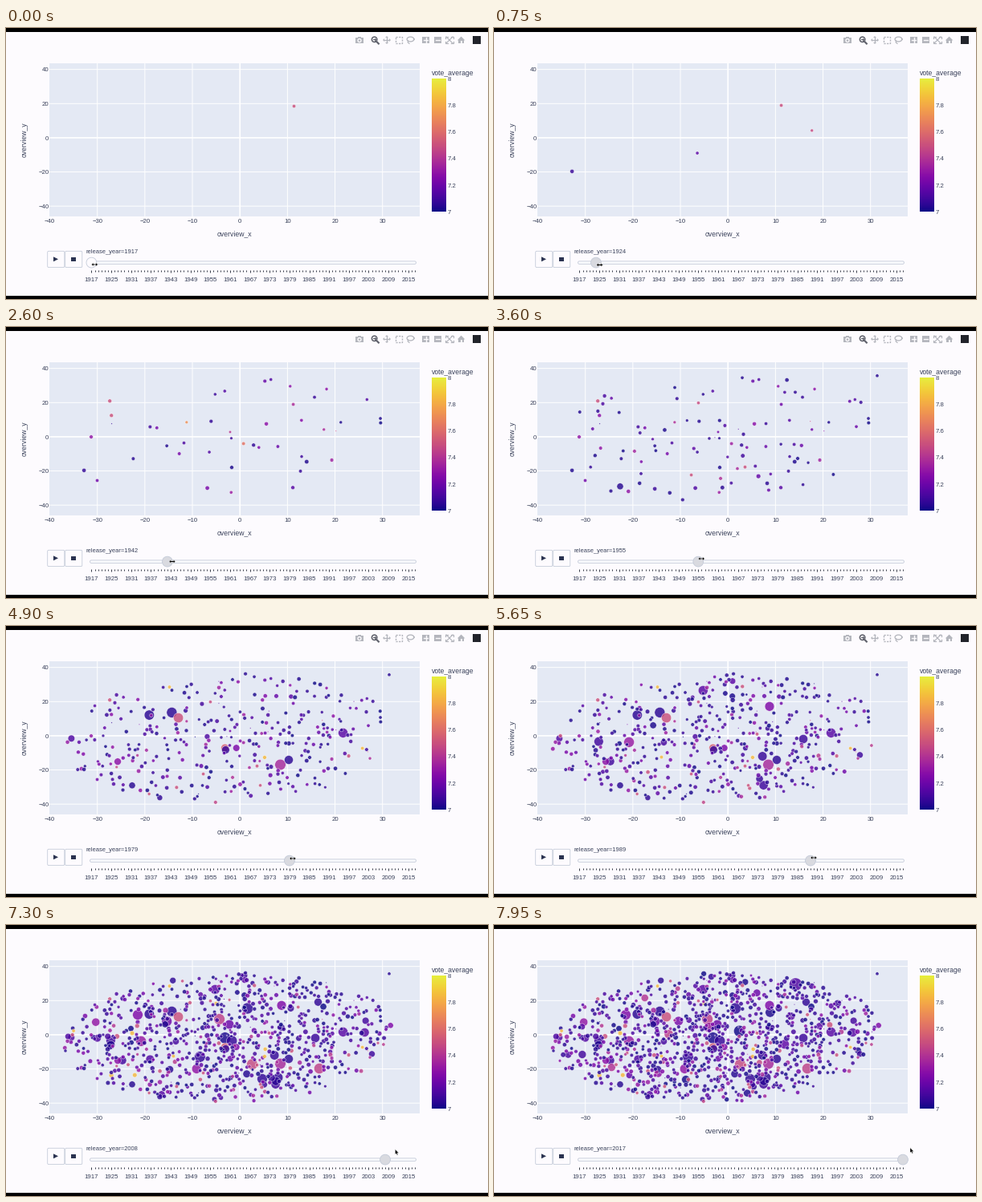
Recreate the animation shown at these times as a matplotlib script. Size 600 px wide and 338 px high, loop 8000 ms.

```python
import numpy as np
import matplotlib.pyplot as plt
from matplotlib.animation import FuncAnimation
from matplotlib.colors import ListedColormap
from matplotlib.patches import Circle, FancyBboxPatch, Polygon, Rectangle

W, H, DPI = 600, 338, 100
FRAMES, STEP_MS = 160, 50
LAST = 98
PT = 72 / DPI
INK, PANEL, PAPER = "#39415a", "#e4e9f4", "#fdfbfe"
EDGE, ICON, ACTIVE = "#c3cad8", "#b4b6bd", "#62646e"

plt.rcParams["font.family"] = "Liberation Sans"
fig = plt.figure(figsize=(W / DPI, H / DPI), dpi=DPI, facecolor=PAPER)
ax = fig.add_axes([0, 0, 1, 1])
ax.axis("off")

# plasma, softened towards its bright end
ramp = np.linspace(0, 1, 256)
soft = 0.16 * ramp[:, None]
CMAP = ListedColormap(plt.get_cmap("plasma")(ramp)[:, :3] * (1 - soft) + 0.72 * soft)


def rect(x0, y0, x1, y1, fill, edge="none", lw=0.0, z=4, **kw):
    return ax.add_patch(Rectangle((x0, y0), x1 - x0, y1 - y0, facecolor=fill,
                                  edgecolor=edge, linewidth=lw * PT, zorder=z, **kw))


def line(xs, ys, color, lw, z=4, **kw):
    return ax.plot(xs, ys, color=color, lw=lw * PT, zorder=z, **kw)[0]


def text(x, y, s, size=7.75, ha="center", **kw):
    kw.setdefault("va", "baseline")
    return ax.text(x, y, s, fontsize=size * PT, ha=ha, color=INK, zorder=6, **kw)


def rounded(x0, y0, x1, y1, fill, radius):
    ax.add_patch(FancyBboxPatch((x0, y0), x1 - x0, y1 - y0,
                                boxstyle=f"round,pad=0,rounding_size={radius}",
                                facecolor=fill, edgecolor=EDGE,
                                linewidth=0.8 * PT, zorder=3))


def poly(points, fill, edge="none", lw=0.0, z=4):
    return ax.add_patch(Polygon(points, closed=True, facecolor=fill, edgecolor=edge,
                                linewidth=lw * PT, zorder=z))


def ring(x, y, r, edge, lw):
    return ax.add_patch(Circle((x, y), r, fc="none", ec=edge, lw=lw * PT, zorder=5))


def px(x):
    return 291.2 + 5.917 * x


def py(y):
    return 136.9 - 2.131 * y


def slot(i):
    return 106.4 + 4.108 * i


def year(i):
    return 1917 if i == 0 else 1919 + i


def signed(v):
    return str(v).replace("-", "\u2212")


def draw_axes():
    rect(54.3, 44, 514.5, 235, PANEL, z=1)
    for v in range(-40, 40, 10):
        if v > -40:
            line([px(v)] * 2, [44, 235], "white", 1 if v else 1.7, 2, snap=False)
        text(px(v), 243.2, signed(v))
    for v in range(-40, 41, 20):
        line([54.3, 514.5], [py(v)] * 2, "white", 1 if v else 1.7, 2, snap=False)
        text(53.3, py(v) + 2.7, signed(v), ha="right")
    text(284.5, 259.6, "overview_x", 8.6)
    text(23.5, 139.5, "overview_y", 8.6, rotation=90, va="center")


def draw_colorbar():
    ax.imshow(ramp[::-1, None], cmap=CMAP, extent=(530, 547.6, 229, 63.3),
              aspect="auto", zorder=3)
    for k in range(6):
        text(549.3, 231.7 - 33.15 * k, f"{7 + 0.2 * k:.2g}", ha="left")
    text(529.6, 58.6, "vote_average", 8.6, ha="left")


def draw_controls():
    rounded(51.7, 278.3, 72.8, 298.6, PAPER, 1.5)
    rounded(73.7, 278.3, 94.8, 298.6, PAPER, 1.5)
    poly([(59, 285.3), (59, 291.3), (65, 288.3)], "#2a3250")
    rect(81.4, 285.6, 86.6, 290.8, "#2a3250")
    rounded(104.6, 290.9, 510.4, 294.4, "#f8f9fc", 1.6)
    for i in range(LAST + 1):
        major = i % 6 == 0
        line([slot(i)] * 2, [301.6, 305 if major else 304], "#3a3f4c", 1,
             solid_capstyle="butt")
        if major:
            text(slot(i), 315.6, str(year(i)))


def draw_modebar():
    y = 15
    # camera, zoom
    parts = [rect(435, 12.3, 445, 19, ICON), rect(437.7, 10.8, 442.3, 13, ICON),
             ring(440, 15.6, 2, PAPER, 1.3),
             ring(458.6, 14.3, 3.2, ACTIVE, 1.6),
             line([461, 463.8], [16.7, 19.5], ACTIVE, 2.2),
             line([457, 460.2], [14.3] * 2, ACTIVE, 1),
             line([458.6] * 2, [12.7, 15.9], ACTIVE, 1)]
    # pan
    for dx, dy in ((1, 0), (-1, 0), (0, 1), (0, -1)):
        bx, by = 474 + 2.9 * dx, y + 2.9 * dy
        parts += [line([474, bx], [y, by], ICON, 1.3),
                  poly([(474 + 5 * dx, y + 5 * dy), (bx + 2 * dy, by + 2 * dx),
                        (bx - 2 * dy, by - 2 * dx)], ICON)]
    # box select, lasso
    a = np.linspace(0, 2 * np.pi, 40)
    parts += [rect(484.6, 10.8, 493.2, 19.2, "none", ICON, 1.4, linestyle=(0, (1.6, 1))),
              line(503.5 + 4.4 * np.cos(a), 14 - 2.9 * np.sin(a), ICON, 1.3),
              line([500.5, 500.2, 502], [16, 18, 19.4], ICON, 1.2)]
    # zoom in and out
    for x in (522.5, 537.3):
        parts += [rect(x - 4.5, y - 4.3, x + 4.5, y + 4.3, ICON),
                  line([x - 2.6, x + 2.6], [y, y], PAPER, 1.4, 5)]
    parts.append(line([522.5] * 2, [y - 2.6, y + 2.6], PAPER, 1.4, 5))
    # autoscale
    for s in (-1, 1):
        parts.append(line([548, 556], [y - 4 * s, y + 4 * s], ICON, 1.2))
        for t in (-1, 1):
            x, cy = 552 + 4.8 * s, y + 4.4 * t
            parts.append(line([x - 2.6 * s, x, x], [cy, cy, cy - 2.6 * t], ICON, 1.2))
    # home, badge
    parts += [poly([(561.8, 15.4), (566.6, 10.6), (571.4, 15.4)], ICON),
              rect(563.2, 14.6, 565.7, 19.2, ICON), rect(567.5, 14.6, 570, 19.2, ICON),
              rect(563.2, 14.4, 570, 16.3, ICON),
              rect(581.3, 10.2, 591, 19.8, "#22242b")]
    return parts


def growth(step):
    """Number of films on show at a slider step."""
    return 0.65 * step + 945 * (step / LAST) ** 2.4


# a few landmark bubbles: x, y, radius, first step, vote
LANDMARKS = np.array([
    (357.6, 96.5, 2.2, 0, 7.5), (157, 198.8, 4.1, 30, 7.04), (477, 60.8, 2.1, 29, 7.04),
    (341.5, 173, 6.8, 55, 7.36), (352, 167, 5.5, 57, 7.05), (272.5, 152, 4.9, 52, 7.55),
    (343, 100.3, 5.9, 66, 7.25), (385, 141, 5.6, 68, 7.08), (164, 112, 6.4, 78, 7.25),
    (319, 192, 6.4, 78, 7.06), (390, 179, 6.6, 79, 7.45), (375.5, 74, 8, 94, 7.13),
])


def scatter_spots(rng, count):
    """Random places in a leaning oval, denser towards its middle."""
    spots = [tuple(p) for p in LANDMARKS[:, :2]]
    depth = []
    while len(depth) < count:
        u, v = rng.uniform(-1, 1, 2)
        d = u * u + v * v
        if d > 1 or rng.random() < 0.6 * d * d:
            continue
        x, y = px(-2 + 35 * u), py(-1.5 + 38 * v + 5 * u * (1 - v * v))
        gap = np.hypot(*(np.array(spots) - (x, y)).T).min()
        if gap > (5.5 if len(depth) < 200 else 2.4):
            spots.append((x, y))
            depth.append(1 - d)
    return np.array(spots), np.array(depth)


def make_films(seed=19):
    rng = np.random.default_rng(seed)
    count = int(growth(LAST))
    steps = np.arange(LAST + 1)
    born = np.interp(np.arange(1, count + 1), growth(steps), steps)
    spots, depth = scatter_spots(rng, count)

    r = rng.normal(2.2, 0.2, count) + rng.exponential(0.5, count) * (born / LAST) ** 2
    r[rng.random(count) < 0.04] = 0.8
    giant = (born > 45) & (rng.random(count) < 0.075)
    r[giant] = 3.4 + rng.uniform(0.5, 4, giant.sum()) * np.sqrt(depth[giant])

    vote = 7 + np.minimum(rng.exponential(0.14, count), 0.5)
    vote[~giant & (rng.random(count) < 0.012)] = 7.85
    early = born < 12
    vote[early] = 7 + rng.uniform(0.05, 0.95, early.sum())

    x, y = spots.T
    r = np.r_[LANDMARKS[:, 2], np.clip(r, 0.7, 7.2)]
    born = np.r_[LANDMARKS[:, 3], born]
    vote = np.r_[LANDMARKS[:, 4], vote]
    order = np.argsort(-r, kind="stable")
    return [a[order] for a in (x, y, r, born, vote)]


rect(0, 0, W, 5, "black", z=9)
rect(0, 334, W, H, "black", z=9)
draw_axes()
draw_colorbar()
draw_controls()
modebar = draw_modebar()

fx, fy, fr, born, votes = make_films()
places = np.c_[fx, fy]
areas = (2 * fr * PT) ** 2
dots = ax.scatter(fx, fy, s=areas, c=votes, cmap=CMAP, vmin=7, vmax=8,
                  alpha=0.82, edgecolors="white", linewidths=0.5 * PT, zorder=5)
label = text(100, 281, "", 7.5, ha="left")
handle = ax.add_patch(Circle((107, 292.6), 6.4, ec=EDGE, lw=0.8 * PT, zorder=7))

half = np.array([(-1.5, -2.3), (-1.5, -0.7), (1.5, -0.7), (1.5, -2.3), (4, 0)])
RESIZE = np.r_[half, -half]
ARROW = np.array([(0, 0), (0, 6.6), (1.5, 5.3), (2.5, 7.6), (3.6, 7.1),
                  (2.6, 4.9), (4.6, 4.8)])
pointer = poly(RESIZE, "black", "white", 0.4, 8)

ax.set_xlim(0, W)
ax.set_ylim(H, 0)

# drag: time, slider step, pointer height
TIMES = [0, 1600, 3600, 4900, 5650, 6600, 7950]
STEPS = [0, 11, 36, 60, 70, 81, LAST]
HEIGHTS = [295, 296, 289, 290, 289, 281.8, 277.6]
RELEASE = 6200


def update(frame):
    t = frame * STEP_MS
    pos = np.interp(t, TIMES, STEPS)
    step = int(pos + 1e-6)
    dragging = t < RELEASE
    label.set_text(f"release_year={year(step)}")
    handle.center = (slot(step), 292.6)
    handle.set_facecolor(PAPER if step == 0 else "#d9dae0")

    alive = born <= step
    fade = 1 - 0.6 * min(step / 36, 1) ** 2
    shown = np.where(born < 12, 7 + (votes - 7) * fade, votes)
    dots.set_offsets(places[alive])
    dots.set_sizes(areas[alive])
    dots.set_array(shown[alive])

    pointer.set_xy((RESIZE if dragging else ARROW)
                   + (slot(pos) + (4 if dragging else 9), np.interp(t, TIMES, HEIGHTS)))
    for part in modebar:
        part.set_visible(dragging)
    return dots, label, handle, pointer


anim = FuncAnimation(fig, update, frames=FRAMES, interval=STEP_MS, repeat=True,
                     repeat_delay=0, blit=False)
plt.show()
```
